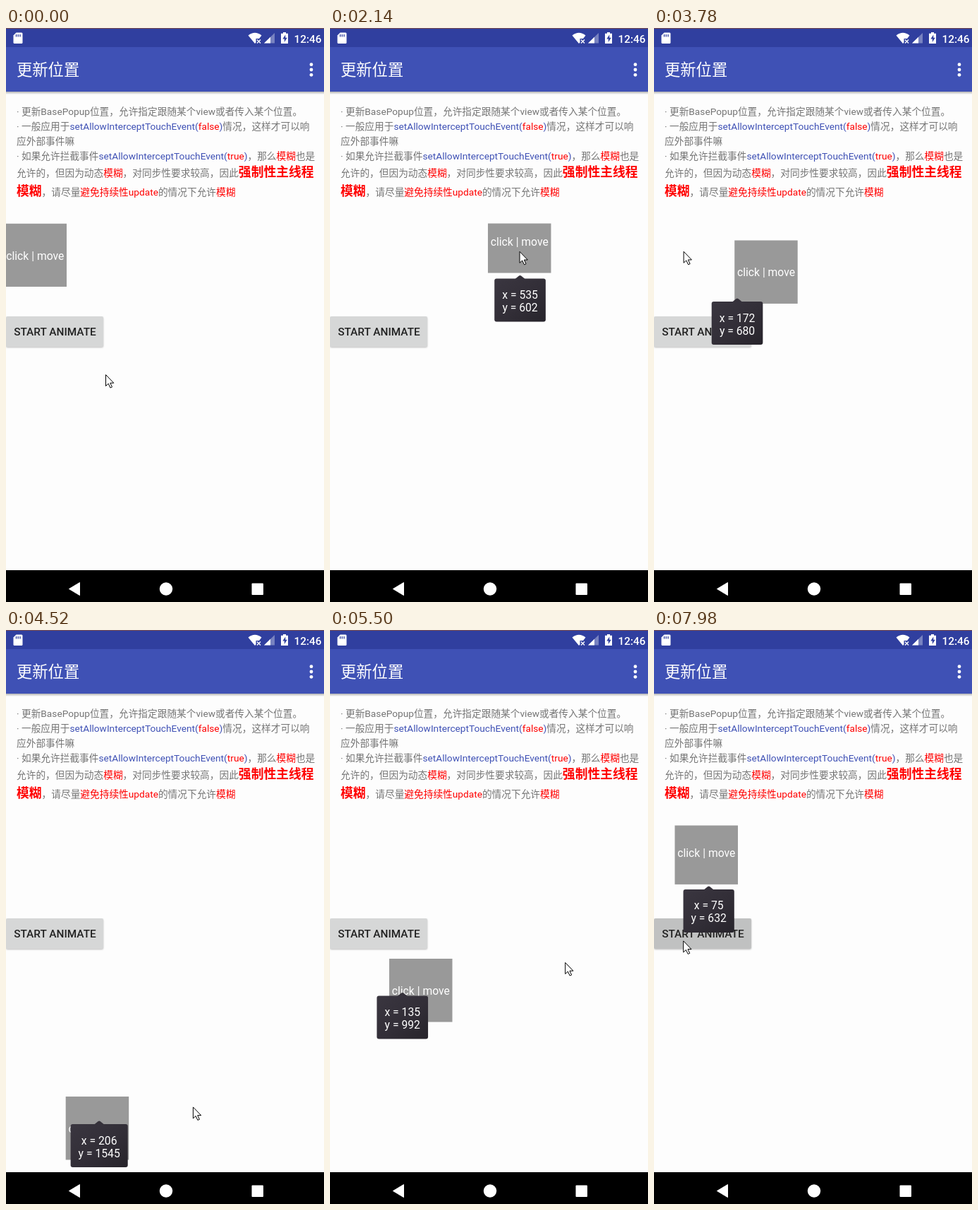
Write an HTML page that moves like this. It is 451 px wide and 812 px high and loops after 8000 ms.

```html
<!DOCTYPE html>
<html lang="zh-CN">
<head>
<meta charset="utf-8">
<title>更新位置</title>
<style>
html, body { margin: 0; width: 100%; height: 100%; overflow: hidden; background: #fdfdfd; }
svg { display: block; width: 100%; height: 100%; }
text { font-family: Roboto, 'Noto Sans CJK SC', 'Noto Sans CJK', sans-serif; white-space: pre; }
.body { font-size: 13.7px; fill: #757575; }
.body .b { fill: #3f51b5; }
.body .r { fill: #f00; }
.body .s { fill: #f00; font-size: 17.8px; font-weight: 700; }
.label { font-size: 15.7px; fill: #fff; text-anchor: middle; }
</style>
</head>
<body>
<svg viewBox="0 0 451 812" xmlns="http://www.w3.org/2000/svg">
  <defs>
    <linearGradient id="fade" x2="0" y2="1">
      <stop stop-color="#000" stop-opacity=".3"/><stop offset="1" stop-color="#000" stop-opacity="0"/>
    </linearGradient>
    <linearGradient id="dark" x2="1" y2="1">
      <stop stop-color="#3a3640"/><stop offset=".55" stop-color="#322e37"/><stop offset="1" stop-color="#27242b"/>
    </linearGradient>
    <clipPath id="area"><rect y="276.5" width="451" height="490.5"/></clipPath>
    <filter id="soft" x="-10%" y="-20%" width="120%" height="150%"><feGaussianBlur stdDeviation="1"/></filter>
  </defs>

  <rect width="451" height="812" fill="#fdfdfd"/>
  <rect y="90" width="451" height="4" fill="url(#fade)"/>
  <rect width="451" height="28" fill="#303f9f"/>
  <rect width="451" height="1" fill="#7b4f50"/>
  <rect y="27" width="451" height="63" fill="#3f51b5"/>

  <g fill="#fff">
    <path d="M14.5 6.5H22a1.5 1.5 0 0 1 1.5 1.5V20.5a1.5 1.5 0 0 1-1.5 1.5H12a1.5 1.5 0 0 1-1.5-1.5V10.5Z"/>
    <path d="M14.5 9v3.5M17.2 9v3.5M20 9v3.5" stroke="#303f9f" stroke-width="1.3"/>
    <path d="M343.5 10.5Q353 3 362.5 10.5L359 15H354.5V20.5L353 22Z"/>
    <path d="M356 16.5l5 5m0-5l-5 5" stroke="#fff" stroke-width="1.4"/>
    <path d="M366 21.5L381 7V21.5Z" opacity=".35"/>
    <path d="M366 21.5L375 12.8V21.5Z"/>
    <path d="M393 6h4v1.8h3V22h-10V7.8h3Z"/>
    <path d="M396.3 9.5l-4 6h2.5v4.5l4-6.3h-2.5Z" fill="#303f9f"/>
    <text x="408.5" y="20.5" font-size="15.4" font-weight="500">12:46</text>
    <text x="15" y="67" font-size="22.3">更新位置</text>
    <circle cx="433" cy="51.7" r="2.4"/><circle cx="433" cy="59" r="2.4"/><circle cx="433" cy="66.3" r="2.4"/>
  </g>

  <g class="body">
    <text x="15" y="122.5">· 更新BasePopup位置，允许指定跟随某个view或者传入某个位置。</text>
    <text x="15" y="144">· 一般应用于<tspan class="b">setAllowInterceptTouchEvent(</tspan><tspan class="r">false</tspan><tspan class="b">)</tspan>情况，这样才可以响</text>
    <text x="15" y="165">应外部事件嘛</text>
    <text x="15" y="186">· 如果允许拦截事件<tspan class="b">setAllowInterceptTouchEvent(</tspan><tspan class="r">true</tspan><tspan class="b">)</tspan>，那么<tspan class="r">模糊</tspan>也是</text>
    <text x="15" y="210">允许的，但因为动态<tspan class="r">模糊</tspan>，对同步性要求较高，因此<tspan class="s">强制性主线程</tspan></text>
    <text x="15" y="236.5"><tspan class="s">模糊</tspan>，请尽量<tspan class="r">避免持续性update</tspan>的情况下允许<tspan class="r">模糊</tspan></text>
  </g>

  <g clip-path="url(#area)">
    <g id="box">
      <rect width="89.5" height="89.5" fill="#999"/>
      <text class="label" x="44.8" y="51">click | move</text>
    </g>
  </g>

  <rect y="409" width="138" height="43" rx="2" opacity=".25" filter="url(#soft)"/>
  <rect id="button" y="408" width="138" height="43" rx="2"/>
  <text x="69.5" y="435" font-size="15.4" font-weight="500" fill="#212121" text-anchor="middle">START ANIMATE</text>

  <g id="popup">
    <path d="M-7 5L-1.5 .5Q0-.5 1.5 .5L7 5Z" fill="#35313a"/>
    <rect id="bubble" y="4.5" height="61" rx="3" fill="url(#dark)"/>
    <text id="tx" class="label" y="33"></text>
    <text id="ty" class="label" y="51"></text>
  </g>

  <rect y="767" width="451" height="45"/>
  <g fill="#fff">
    <path d="M89.5 793.5L104.5 784.5V802.5Z" stroke="#fff" stroke-linejoin="round"/>
    <circle cx="227" cy="793.5" r="9.2"/>
    <rect x="348.5" y="785.5" width="16.5" height="16.5" rx="1"/>
  </g>

  <path id="cursor" d="M.5 .5V16.5L4.2 13.1L7 19L9.5 17.9L6.8 12.2H11.8Z" fill="#fff" stroke="#000"/>
</svg>
<script>
const LOOP = 8000, SIZE = 89.5, SCALE = 451 / 1080;
const POPUP_LAG = 30, CURSOR_LAG = 120;
const [box, button, popup, bubble, tx, ty, cursor] =
  ['box', 'button', 'popup', 'bubble', 'tx', 'ty', 'cursor'].map(id => document.getElementById(id));

// Turning points of the drag: ms, x, y.
const drag = [
  [880, -3.5, 276.5], [1620, 109, 200], [1850, 175, 388], [2020, 226, 271], [2140, 224, 257],
  [2910, 124, 424], [3030, 81, 488.5], [3330, 290, 262], [3650, -2, 270], [3960, 300, 344],
  [4180, 300, 344], [4400, 223, 629], [4490, 87.6, 651.3], [4520, 84.7, 660], [5100, 330, 340],
  [5380, 291, 425], [5470, 57.9, 420.8], [5500, 84, 465], [5780, 36, 440], [5940, 234.3, 282.6],
  [6390, 234.3, 282.6], [6660, 33.7, 270.4], [7940, 33.7, 270.4], [7980, 29.5, 270.4]
];

const clamp = u => Math.max(0, Math.min(1, u));

function ease(t, from, to) {
  const u = clamp((t - from) / (to - from));
  return u * u * (3 - 2 * u);
}

// Slope at point i, flat at extremes so the curve never overshoots.
function slope(i, c) {
  if (!drag[i - 1] || !drag[i + 1]) return 0;
  const rate = j => (drag[j + 1][c] - drag[j][c]) / (drag[j + 1][0] - drag[j][0]);
  const a = rate(i - 1), b = rate(i);
  return a * b <= 0 ? 0 : 2 * a * b / (a + b);
}

function boxAt(t) {
  let i = 0;
  while (i < drag.length - 2 && drag[i + 1][0] <= t) i++;
  const p = drag[i], q = drag[i + 1], d = q[0] - p[0];
  const u = clamp((t - p[0]) / d), v = 1 - u;
  return [1, 2].map(c =>
    v * v * (1 + 2 * u) * p[c] + u * u * (3 - 2 * u) * q[c] +
    d * u * v * (v * slope(i, c) - u * slope(i + 1, c)));
}

// The cursor comes to the box, trails it while dragging, then goes to the button.
function cursorAt(t) {
  const [x, y] = boxAt(t - CURSOR_LAG);
  const away = 1 - ease(t, 30, 500), grab = ease(t, 830, 1600);
  const leave = ease(t, 7200, 7500), back = ease(t, 7500, 7750);
  return [
    x + 65.5 - 23 * grab + 79 * away - 35 * leave,
    y + 46.5 - 1.5 * grab + 167 * away + 162 * leave - 38 * back
  ];
}

const place = (node, x, y) => node.setAttribute('transform', `translate(${x.toFixed(2)} ${y.toFixed(2)})`);

function draw(t) {
  place(box, ...boxAt(t));
  place(cursor, ...cursorAt(t));

  popup.style.display = t < 830 ? 'none' : '';
  if (t >= 830) {
    const [x, y] = boxAt(t - POPUP_LAG);
    tx.textContent = 'x = ' + Math.round((x - 1.5) / SCALE);
    ty.textContent = 'y = ' + Math.round((y - 6.5) / SCALE);
    const w = 22 + Math.max(tx.getComputedTextLength(), ty.getComputedTextLength());
    bubble.setAttribute('x', -w / 2);
    bubble.setAttribute('width', w);
    place(popup, x + SIZE / 2, Math.min(y + SIZE + 2.5, 694.5));
  }

  const grey = Math.round(214 - 22 * ease(t, 7800, 7950));
  button.setAttribute('fill', `rgb(${grey},${grey + 1},${grey + 1})`);
}

const start = performance.now();
function tick() {
  draw((performance.now() - start) % LOOP);
  requestAnimationFrame(tick);
}
tick();
</script>
</body>
</html>
```
